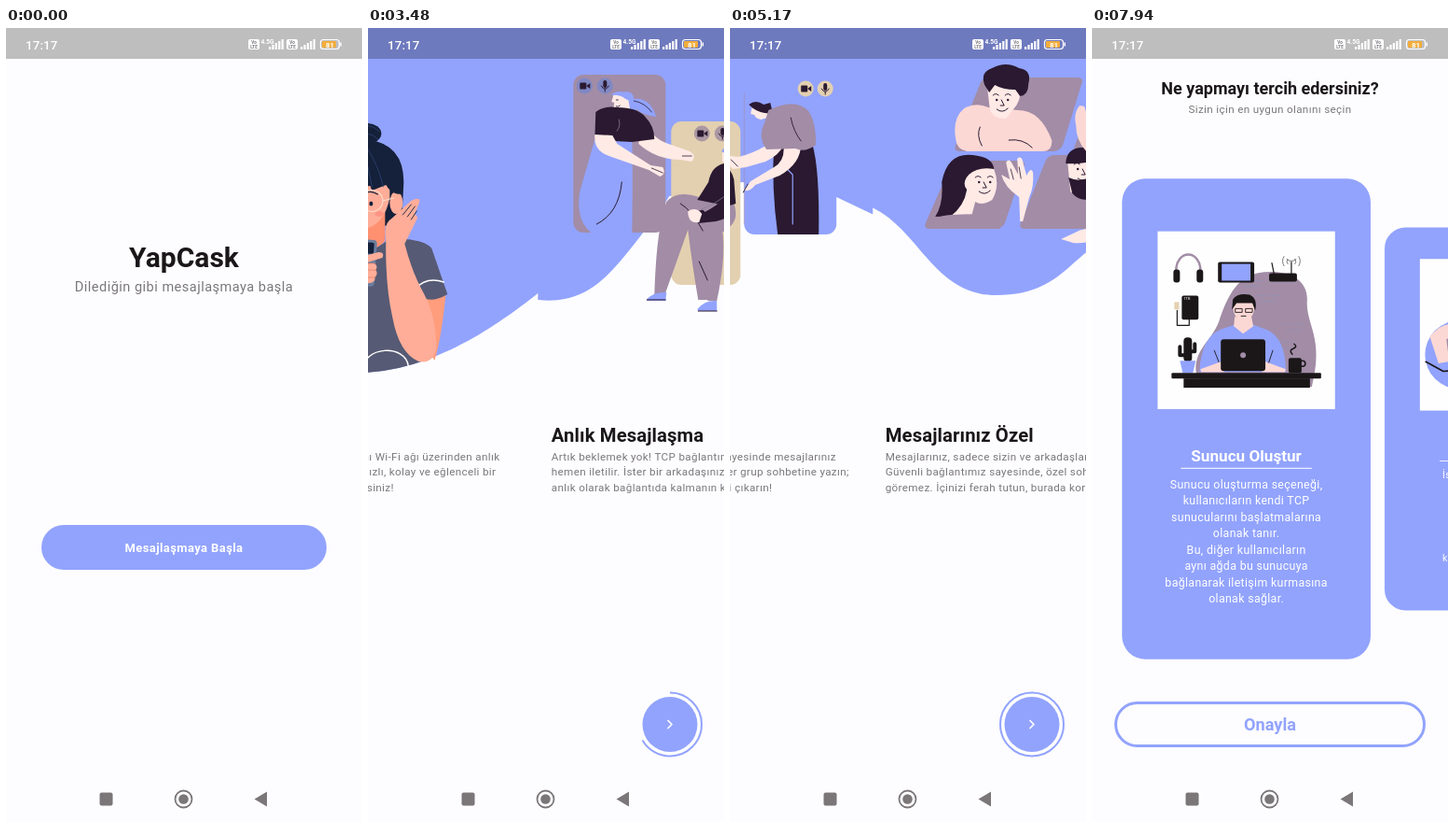
An HTML page that plays this animation: 382x850 px, repeating every 7990 ms.

```html
<!DOCTYPE html>
<html lang="tr">
<head>
<meta charset="utf-8">
<style>
html, body { margin: 0; width: 100%; height: 100%; overflow: hidden; background: #fdfdff; }
svg { display: block; width: 100vw; height: 100vh; font-family: Roboto, "Noto Sans", sans-serif; }
</style>
</head>
<body>
<svg id="stage" viewBox="0 0 382 850"></svg>
<script>
const LOOP = 7990, OPEN = 1800, SWIPES = [3335, 5002], CHOOSE = 6253, LOADED = 6500, DRAG = 7820;
const BLUE = '#92a3fd', PAPER = '#fdfdff', INK = '#1b1719', GREY = '#7b7779';
const DARK = '#15203a', SKIN = '#ffad98', SHADE = '#ff9d7c', SHIRT = '#565a74';
const PLUM = '#2a1930', MAUVE = '#a28ca6', PEACH = '#e3d0b0', CREAM = '#ffeae6', SAND = '#fcd8d4';

// markup helpers
const shape = (d, fill) => `<path d="${d}" fill="${fill}"/>`;
const line = (d, color, w = 1.2) =>
  `<path d="${d}" fill="none" stroke="${color}" stroke-width="${w}" stroke-linecap="round" stroke-linejoin="round"/>`;
const dot = (x, y, rx, fill, ry = rx) => `<ellipse cx="${x}" cy="${y}" rx="${rx}" ry="${ry}" fill="${fill}"/>`;
const hoop = (x, y, r, color, w = 1.5) => `<circle cx="${x}" cy="${y}" r="${r}" fill="none" stroke="${color}" stroke-width="${w}"/>`;
const box = (x, y, w, h, fill, r = 0) => `<rect x="${x}" y="${y}" width="${w}" height="${h}" rx="${r}" fill="${fill}"/>`;
const text = (x, y, size, str, { bold = 400, fill = INK, gap = 0, mid = false } = {}) =>
  `<text x="${x}" y="${y}" font-size="${size}" font-weight="${bold}" fill="${fill}" letter-spacing="${gap}" text-anchor="${mid ? 'middle' : 'start'}">${str}</text>`;
const group = (id, body, move = '') => `<g${id ? ` id="${id}"` : ''}${move ? ` transform="${move}"` : ''}>${body}</g>`;

const welcome = box(0, 0, 382, 804, PAPER)
  + text(191, 256, 30, 'YapCask', { bold: 700, mid: true })
  + text(191, 282, 14.55, 'Dilediğin gibi mesajlaşmaya başla', { fill: GREY, gap: .48, mid: true })
  + box(38, 532, 306, 48, BLUE, 24)
  + text(191, 560.5, 13, 'Mesajlaşmaya Başla', { bold: 700, fill: '#fff', gap: .4, mid: true });

function girl() {
  const hairLines = [168, 180, 192, 204, 216].map(x => line(`M${x} 170Q${x - 4} 150 ${190 + (x - 190) / 3} 128`, '#2c4674', .8)).join('');
  return shape('M0 0H383V283L382 284C345 313 272 368 190 369C110 369 32 325 0 263Z', BLUE)
    + dot(199, 113, 15, DARK, 11) + line('M186 110Q199 98 212 111M190 118Q200 108 210 119', '#2c4674', .8)
    + shape('M157 145Q160 119 195 119Q238 122 238 165L236 205Q224 214 215 211L166 205L160 217Q156 210 154 208L150 214Q142 205 134 198Q151 182 153 165Z', DARK)
    + shape('M95 286L130 290L130 325L91 352Q88 335 95 286ZM255 287L283 285Q279 330 271 356L256 330Z', SHADE)
    + shape('M170 196H218V228Q198 250 154 229Q170 222 170 196Z', '#ff9070')
    + shape('M112 231Q125 225 156 226Q190 254 222 226L240 226Q262 228 268 236L285 285Q272 293 261 290L263 355Q225 369 190 369Q150 368 127 355L129 292Q102 296 85 288Q95 250 112 231Z', SHIRT)
    + hoop(168, 297, 24, '#fff') + line('M106 234Q122 250 141 227M194 367C194 340 240 338 243 362M251 279Q262 266 281 272M126 346Q138 346 142 361', '#fff', 1.5)
    + line('M137 265Q134 278 135 287M257 285Q250 270 248 262', DARK)
    + dot(155, 174, 7, SKIN, 9) + dot(230, 187, 7, SKIN, 12)
    + shape('M161 160Q158 213 188 216Q216 216 223 182V158Z', SKIN)
    + shape('M154 168Q156 124 193 124Q233 126 236 178Q224 178 219 168L204 174L202 169L176 171L173 166L170 172Z', DARK) + hairLines
    + hoop(178, 181, 11.5, '#ffdccc', 1.2) + hoop(204, 185, 11.5, '#ffdccc', 1.2) + line('M190 182L193 183M216 185L227 182', '#ffdccc')
    + dot(179, 185, 2, DARK, 2.6) + dot(203, 188, 2, DARK, 2.6) + line('M172 174Q177 171 183 174M198 176Q204 174 210 178', DARK)
    + dot(168, 196, 5, '#ff9484', 3) + dot(212, 199, 5, '#ff9484', 3) + line('M190 194Q187 198 191 199', '#e87862')
    + shape('M181 201Q189 205 197 203Q195 211 188 210Q182 208 181 201Z', '#fff')
    + shape('M89 350Q92 335 122 303L170 250Q166 232 172 227Q178 226 181 236L193 264Q150 315 128 340Q110 360 96 358Q88 358 89 350Z', SKIN)
    + `<g transform="rotate(4 192 250)">${box(177, 226, 31, 50, '#6b7e9e', 4)}${box(194, 229, 11, 12, DARK, 2)}</g>`
    + shape('M170 229Q176 224 182 238L184 247L211 240Q218 240 215 246L196 252L206 252Q211 254 208 259Q211 263 207 267Q208 272 202 273L184 274L174 262Z', SKIN)
    + line('M196 252L207 252M194 259H208M193 267H207', '#e8806c', .8)
    + shape('M219 226Q216 209 225 204L246 185Q256 180 255 186L250 199L253 203L247 215L239 231Q247 262 260 285Q273 310 273 342Q270 360 254 357Q233 348 226 310Q218 275 219 226Z', SKIN)
    + line('M237 200L246 189M242 202L250 191M246 205L252 196', DARK, .9);
}

function camMic(x, y, fill, gap = 22) {
  return dot(x, y, 8.5, fill) + dot(x + gap, y, 8.5, fill)
    + box(x - 5, y - 3.5, 7, 7, PLUM, 1) + shape(`M${x + 2} ${y}l4 -3v6z`, PLUM)
    + box(x + gap - 2, y - 6, 4, 8, PLUM, 2) + line(`M${x + gap - 4} ${y}q4 7 8 0m-4 3v3`, PLUM, 1);
}

function trio() {
  return shape('M5 0H388V199.5L349 181Q300 165 240 165L146 180Q136 197 118 219C84 262 60 297 5 291Z', BLUE)
    + box(43, 50, 99, 169, MAUVE, 11) + box(148, 100, 98, 175, PEACH, 11) + box(250, 50, 99, 171, BLUE, 11)
    + line('M250 70V210', MAUVE, .6)
    + camMic(55, 62, '#8088c4') + camMic(181, 113, '#ab98a2') + camMic(316, 65, PEACH, 21)
    // standing woman
    + shape('M67 116L106 119Q107 150 106 219H62Q45 205 50 175Z', BLUE) + line('M95 165Q92 198 68 210', PLUM, 1)
    + shape('M96 69Q107 66 108 76Q125 74 132 95Q117 93 111 87Q105 97 98 89Z', BLUE) + line('M108 78Q120 80 127 90', PLUM, .8)
    + shape('M86 72Q92 67 101 71L104 88Q96 92 91 88L86 86L87 80L84 79Z', CREAM)
    + shape('M83 72Q90 65 102 70L104 78L99 76Q93 71 83 72Z', BLUE) + line('M89 77h2M89 84q3 1 4 -1', PLUM, .9)
    + shape('M118 94Q124 117 145 124L168 132Q176 137 170 143L158 141Q132 141 113 124Z', CREAM)
    + shape('M67 90Q75 83 90 85Q112 85 120 95Q130 105 130 119L106 122L66 120Z', PLUM)
    + shape('M66 114Q64 132 84 138L124 152L136 159Q143 156 139 149L126 147L90 124L85 115Z', CREAM)
    + line('M92 98Q94 105 90 110', '#8a7f98', .8) + line('M127 150L139 155M160 137L170 137', PLUM, .8)
    // seated woman
    + shape('M178 181Q190 178 198 186L239 188Q245 205 233 214Q215 221 187 216L190 291H177Q170 250 166 216L141 286H130Q132 215 143 186Q154 173 178 181Z', MAUVE)
    + shape('M164 198L187 250Q191 270 187 292L197 292Q207 245 203 217Z', MAUVE) + line('M158 188Q170 195 182 217M178 250L187 270', PLUM, 1)
    + shape('M122 290Q130 282 143 283L142 292H122ZM176 301Q184 291 197 292L197 303H177Z', BLUE) + line('M122 291H142M177 303H197', PLUM, 1)
    + shape('M188 165Q191 148 205 145Q234 140 239 162L241 188Q224 194 206 190L176 184Z', PLUM)
    + shape('M203 133L217 128L221 146Q216 154 208 151L207 146L203 143Z', CREAM)
    + shape('M202 132Q209 121 220 126Q227 133 222 145L226 160Q217 158 215 138Q208 136 202 132Z', BLUE)
    + line('M208 138v2M208 146l3 -1', PLUM, .9)
    + shape('M175 198Q182 192 184 197Q209 185 220 160L238 172Q227 199 196 207L177 209Z', PLUM)
    + line('M181 194Q208 184 219 163', '#8a7f98', .7)
    + shape('M166 196Q175 191 181 199L178 208Q166 210 166 196Z', CREAM)
    // standing man
    + shape('M282 125L323 124Q331 150 330 221H286Q279 170 282 125Z', PLUM) + line('M294 149L302 157V210', BLUE)
    + shape('M258 86Q266 81 274 84L279 95L268 98Q262 97 261 93L257 92Z', CREAM) + shape('M255 82Q262 76 271 82L278 80L281 92L272 91Q263 90 255 82Z', PLUM)
    + shape('M275 125Q258 135 244 138L234 137Q230 145 238 151L252 149L273 143Q288 136 293 124ZM292 122Q295 142 282 149L257 164L250 173Q254 177 262 168L288 158Q311 145 311 124Z', CREAM)
    + shape('M276 88Q305 74 319 89Q327 100 327 125Q315 134 305 129L274 130Q264 117 272 101Z', MAUVE)
    + line('M300 96Q303 111 311 121M236 141L243 148M254 167L249 176', PLUM, .9);
}

function meeting() {
  const slant = (x, y, w, h) => shape(`M${x + 32} ${y}h${w - 38}q8 0 5 7l-${20} ${h - 14}q-3 7 -10 7h-${w - 35}q-7 0 -4 -7l26 -${h - 14}q3 -7 10 -7z`, MAUVE);
  const face = (x, y) => line(`M${x - 9} ${y - 7}q3 -3 6 0M${x + 4} ${y - 7}q3 -3 6 0M${x} ${y - 2}l3 6h-4M${x - 5} ${y + 8}q6 5 12 -1`, PLUM, 1)
    + dot(x - 5, y - 2, 1.2, PLUM) + dot(x + 7, y - 2, 1.2, PLUM);
  return shape('M153 0H536V90C500 90 470 190 430 215C365 235 365 286 287 286C220 286 205 215 153 191.5Z', BLUE)
    + slant(244, 53, 136, 79) + slant(212, 142, 106, 73) + slant(314, 136, 124, 79) + slant(372, 53, 130, 79)
    // man on top
    + shape('M244 119Q240 97 253 86Q266 79 279 85L311 88Q335 88 347 120Q348 132 338 132H256Q245 130 244 119Z', SAND)
    + shape('M278 65Q280 57 307 56Q318 68 309 83L298 97Q281 98 280 82Z', CREAM)
    + shape('M275 61Q270 47 283 43Q298 35 312 43Q326 45 322 60Q322 72 313 73L308 66Q294 66 286 61L280 69Z', PLUM) + face(293, 79)
    + line('M272 126Q266 115 270 106M326 128Q316 118 301 120', PLUM, 1)
    // waving man
    + shape('M222 202Q231 189 229 165Q235 133 262 136Q284 138 285 151L262 191Q254 201 222 202Z', PLUM)
    + shape('M258 157Q268 148 285 151Q292 169 283 184Q272 191 265 186L261 201L238 202Q253 191 256 173Q250 166 258 157Z', CREAM) + face(274, 167)
    + shape('M214 215Q219 201 239 200L266 199Q285 205 292 215Z', MAUVE)
    + shape('M313 207L312 181Q296 170 293 157L302 162L298 144Q301 138 305 146L311 157L310 140Q315 135 317 147L320 158Q325 148 327 155Q328 170 323 181L316 207Z', CREAM)
    + line('M303 151L306 162M312 149L314 161', PLUM, .8)
    // bearded man
    + shape('M328 215Q334 191 363 184L399 183Q424 192 428 215Z', MAUVE)
    + shape('M364 143H399L397 178Q380 188 367 175Z', CREAM)
    + shape('M362 145Q363 127 382 128Q402 126 402 152L398 176Q382 191 369 177L365 160Q380 167 394 156L393 142Q378 146 362 145Z', PLUM) + face(380, 153)
    + shape('M357 226L372 219Q382 213 402 215L408 222Q384 232 370 230Z', CREAM)
    // woman on top right
    + shape('M384 132Q373 120 373 104Q370 91 377 83L382 84L389 106L406 93H433Q457 99 460 132Z', SAND)
    + shape('M399 73Q400 50 421 50Q441 53 438 90H407Z', PLUM) + dot(418, 77, 14, CREAM, 18) + face(418, 77);
}

const PAGES = [
  [girl(), 'Merhaba!', 'Bu uygulama, arkadaşlarınızla aynı Wi-Fi ağı üzerinden anlık',
    'olarak iletişim kurmanızı sağlar. Hızlı, kolay ve eğlenceli bir', 'iletişim deneyimi için doğru yerdesiniz!'],
  [group('', trio(), 'translate(-5)'), 'Anlık Mesajlaşma', 'Artık beklemek yok! TCP bağlantımız sayesinde mesajlarınız',
    'hemen iletilir. İster bir arkadaşınıza, ister grup sohbetine yazın;', 'anlık olarak bağlantıda kalmanın keyfini çıkarın!'],
  [group('', meeting(), 'translate(-154)'), 'Mesajlarınız Özel', 'Mesajlarınız, sadece sizin ve arkadaşlarınız arasında.',
    'Güvenli bağlantımız sayesinde, özel sohbetlerinizi kimse', 'göremez. İçinizi ferah tutun, burada korunuyorsunuz!'],
];
const pages = PAGES.map(([art, title, ...body], i) => group('', art
  + text(14.5, 442.5, 20.3, title, { bold: 700, gap: .1 })
  + body.map((s, n) => text(14.5, 462.7 + n * 16.6, 11.66, s, { fill: GREY, gap: .34 })).join(''), `translate(${382 * i})`)).join('');
const onboard = box(0, 0, 382, 804, PAPER) + group('strip', pages)
  + dot(324, 745.5, 29.5, BLUE)
  + `<circle id="ring" cx="324" cy="745.5" r="34" fill="none" stroke="${BLUE}" stroke-width="2" pathLength="3" transform="rotate(-90 324 745.5)"/>`
  + line('M322 741.5L326 745.5L322 749.5', '#fff', 1.7);

function desk() {
  return box(71, 217, 191, 191, '#fefefe')
    + shape('M113 372C108 345 128 337 137 314C145 290 155 267 178 262C205 257 232 265 232 290C230 318 251 330 237 384H122Z', MAUVE)
    + [[160, 270], [178, 286], [204, 317], [192, 336]].map(([x, y]) => line(`M${x} ${y}h8m3 0h14m-20 6h16`, '#9492b4', .8)).join('')
    + line('M91 265V258A13 16 0 0 1 117 258V265', MAUVE, 2.5) + box(88, 258, 7, 14, INK, 3) + box(113, 258, 7, 14, INK, 3)
    + box(136, 250, 39, 22, INK, 2) + box(140, 252, 31, 18, BLUE)
    + box(191, 262, 30, 9, INK, 2) + line('M197 266L194 251M215 263V250', INK)
    + line('M210 247q5 4 10 0M207 244q-3 5 0 10M223 244q3 5 0 10M211 247q-2 3 0 5M219 247q2 3 0 5', GREY, 1)
    + box(97, 286, 18, 26, INK, 2) + text(99, 291, 4, '1TB', { fill: '#fff' }) + line('M105 312V318H92V302', INK, 1.2) + box(89, 293, 5, 8, PEACH)
    + shape('M116 368Q118 330 140 322L155 317H173L189 323Q209 332 209 368Z', BLUE)
    + shape('M154 309H172L174 319L163 327L153 319ZM152 292H175Q177 311 164 313Q151 312 152 292Z', SAND)
    + shape('M151 301L152 290Q157 283 170 285Q179 289 176 302L173 294L156 294Z', INK)
    + line('M155 300h7v4h-7zM166 300h7v4h-7zM161 308h5M132 345L138 360M195 345L190 360', INK, .9)
    + shape('M117 365L139 357L143 368H118ZM209 365L187 357L183 368H208Z', SAND)
    + box(139, 333, 48, 34, INK, 3) + dot(163, 350, 3, MAUVE)
    + box(99, 331, 9, 26, INK, 4) + line('M103 350H95V341M104 346H111V338', INK, 4) + shape('M95 356H112L109 369H98Z', BLUE)
    + box(212, 353, 14, 16, INK, 2) + hoop(227, 359, 3, INK, 1.6) + line('M216 349q-4 -4 1 -6t1 -5', INK, 1.5)
    + box(86, 369, 161, 6, INK, 1) + box(99, 375, 136, 10, INK);
}

function globe() {
  return box(-95.5, -201.5, 191, 191, '#fefefe') + dot(-46, -81, 43, BLUE)
    + shape('M-83 -104Q-60 -130 -44 -112L-50 -74L-72 -70Z', SAND) + line('M-88 -72L-66 -60L-40 -62', INK, 2)
    + shape('M-62 -100Q-20 -130 10 -100L20 -45H-55Z', MAUVE) + dot(-20, -125, 15, SAND) + box(-45, -42, 90, 5, INK, 2);
}

const CARDS = [
  [group('', desk(), 'translate(-166.5 -418.5)'), 'Sunucu Oluştur', 'Sunucu oluşturma seçeneği,', 'kullanıcıların kendi TCP',
    'sunucularını başlatmalarına', 'olanak tanır.', 'Bu, diğer kullanıcıların', 'aynı ağda bu sunucuya', 'bağlanarak iletişim kurmasına', 'olanak sağlar.'],
  [globe(), 'Sunucuya Katıl', 'İstemci olma seçeneği,', 'kullanıcıların mevcut', 'sunuculara',
    'bağlanmasını sağlar.', 'Bu, ağdaki tüm diğer', 'kişiler ile', 'kullanıcıların iletişimini', 'başlatır.'],
];
const cards = CARDS.map(([art, title, ...body], i) => `<rect id="card${i}" fill="${BLUE}"/>` + group('content' + i,
  group('art' + i, art) + group('copy' + i,
    text(0, 45.5, 17.2, title, { bold: 700, fill: '#fff', mid: true }) + box(-70.5, 52.5, 141, 1, '#fff')
    + body.map((s, n) => text(0, 74.8 + n * 17.5, 12.4, s, { fill: '#fff', gap: .35, mid: true })).join('')))).join('');
const choose = box(0, 0, 382, 804, PAPER)
  + text(191, 71, 18, 'Ne yapmayı tercih edersiniz?', { bold: 700, mid: true })
  + text(191, 90.5, 11.66, 'Sizin için en uygun olanını seçin', { fill: GREY, gap: .35, mid: true })
  + cards
  + `<rect x="25.5" y="722.5" width="331" height="46" rx="23" fill="none" stroke="${BLUE}" stroke-width="3"/>`
  + text(191, 752, 18.2, 'Onayla', { bold: 700, fill: BLUE, mid: true });

const LIGHT = '#fff', DIM = '#77757c';
const bars = x => [0, 1, 2, 3, 4].map(i => box(x + i * 3.4, 20 - i * 2, 2.2, 3 + i * 2, LIGHT)).join('');
const volte = x => box(x, 12, 12, 11, LIGHT, 2)
  + text(x + 6, 17.2, 4.6, 'Vo', { bold: 700, fill: DIM, mid: true }) + text(x + 6, 21.8, 4.6, 'LTE', { bold: 700, fill: DIM, mid: true });
const statusBar = box(0, 0, 382, 33, 'rgba(0,0,0,.25)')
  + text(21, 22.7, 13.2, '17:17', { bold: 500, fill: LIGHT, gap: .2 })
  + volte(260) + text(273.5, 17, 6.6, '4.5G', { bold: 700, fill: LIGHT }) + bars(282) + volte(301) + bars(316)
  + `<rect x="337.5" y="12.5" width="20" height="10" rx="3" fill="none" stroke="${LIGHT}" stroke-width="1.2"/>`
  + box(339, 14, 15, 7, '#f3ad3c', 1) + box(358.5, 15.5, 1.5, 4, LIGHT) + text(347.5, 20.6, 8, '81', { bold: 700, fill: LIGHT, mid: true });
const navBar = box(0, 804, 382, 46, PAPER) + box(100.5, 818.5, 14, 14, GREY, 2)
  + hoop(190.5, 825.5, 9, GREY, 1.8) + dot(190.5, 825.5, 5.3, GREY) + shape('M266.5 825.5L280 817.5V833.5Z', GREY);

const scrim = id => `<rect id="${id}" width="382" height="804"/>`;
document.getElementById('stage').innerHTML = box(0, 0, 382, 850, PAPER)
  + group('welcome', welcome) + scrim('scrim0') + group('onboard', onboard) + scrim('scrim1') + group('choose', choose)
  + navBar + statusBar;

const el = Object.fromEntries([...document.querySelectorAll('#stage [id]')].map(n => [n.id, n]));
const set = (id, attrs) => { for (const k in attrs) el[id].setAttribute(k, attrs[k]); };
const clamp = x => Math.min(1, Math.max(0, x));

function bezier(x, x1, y1, x2, y2) {
  const at = (u, a, b) => 3 * (1 - u) ** 2 * u * a + 3 * (1 - u) * u * u * b + u ** 3;
  let lo = 0, hi = 1;
  for (let i = 0; i < 24; i++) {
    const m = (lo + hi) / 2;
    if (at(m, x1, x2) < x) lo = m; else hi = m;
  }
  return at(hi, y1, y2);
}
const zoomCurve = x => x < .166 ? .4 * bezier(x / .166, .05, 0, .133, .06)
  : .4 + .6 * bezier((x - .166) / .834, .208, .82, .25, 1);

// critically damped page spring
function settle(ms) {
  const x = Math.max(0, ms) * .012;
  return 1 - (1 + x) * Math.exp(-x);
}

function pose(id, enter, leave) {
  const scale = (.85 + .15 * zoomCurve(enter)) * (1 + .05 * zoomCurve(leave));
  set(id, {
    transform: `translate(191 402) scale(${scale}) translate(-191 -402)`,
    opacity: clamp((enter - .125) / .125),
    display: enter <= 0 || leave >= 1 ? 'none' : 'inline',
  });
}
const shade = (id, x) => set(id, { opacity: x < 1 ? .6 * clamp((x - .2075) / .21) : 0 });

function update(t) {
  const open = clamp((t - OPEN) / 300), next = clamp((t - CHOOSE) / 300);
  pose('welcome', 1, open);
  pose('onboard', open, next);
  pose('choose', next, 0);
  shade('scrim0', open);
  shade('scrim1', next);

  const page = SWIPES.reduce((sum, at) => sum + settle(t - at), 0);
  set('strip', { transform: `translate(${-382 * page})` });
  const step = Math.round(page) + 1;
  set('ring', { 'stroke-dasharray': step < 3 ? `${step} 3` : 'none' });

  const drag = .095 * clamp((t - DRAG) / 120) ** 1.5, loaded = t >= LOADED;
  for (const i of [0, 1]) {
    const d = i - drag, s = 1 - (.3 * Math.abs(d)) ** 1.695;
    const x = 191 + 267.4 * d, w = 267.4 * s, h = 517 * s * s;
    set('card' + i, { x: x - w / 2, y: 418.5 - h / 2, width: w, height: h, rx: 25 * s });
    set('content' + i, { transform: `translate(${x} 418.5) scale(${s ** 1.4})` });
    set('art' + i, { display: loaded ? 'inline' : 'none' });
    set('copy' + i, { transform: `translate(0 ${loaded ? 0 : -95.5})` });
  }
}

const start = performance.now();
function tick() {
  update((performance.now() - start) % LOOP);
  requestAnimationFrame(tick);
}
tick();
</script>
</body>
</html>
```
